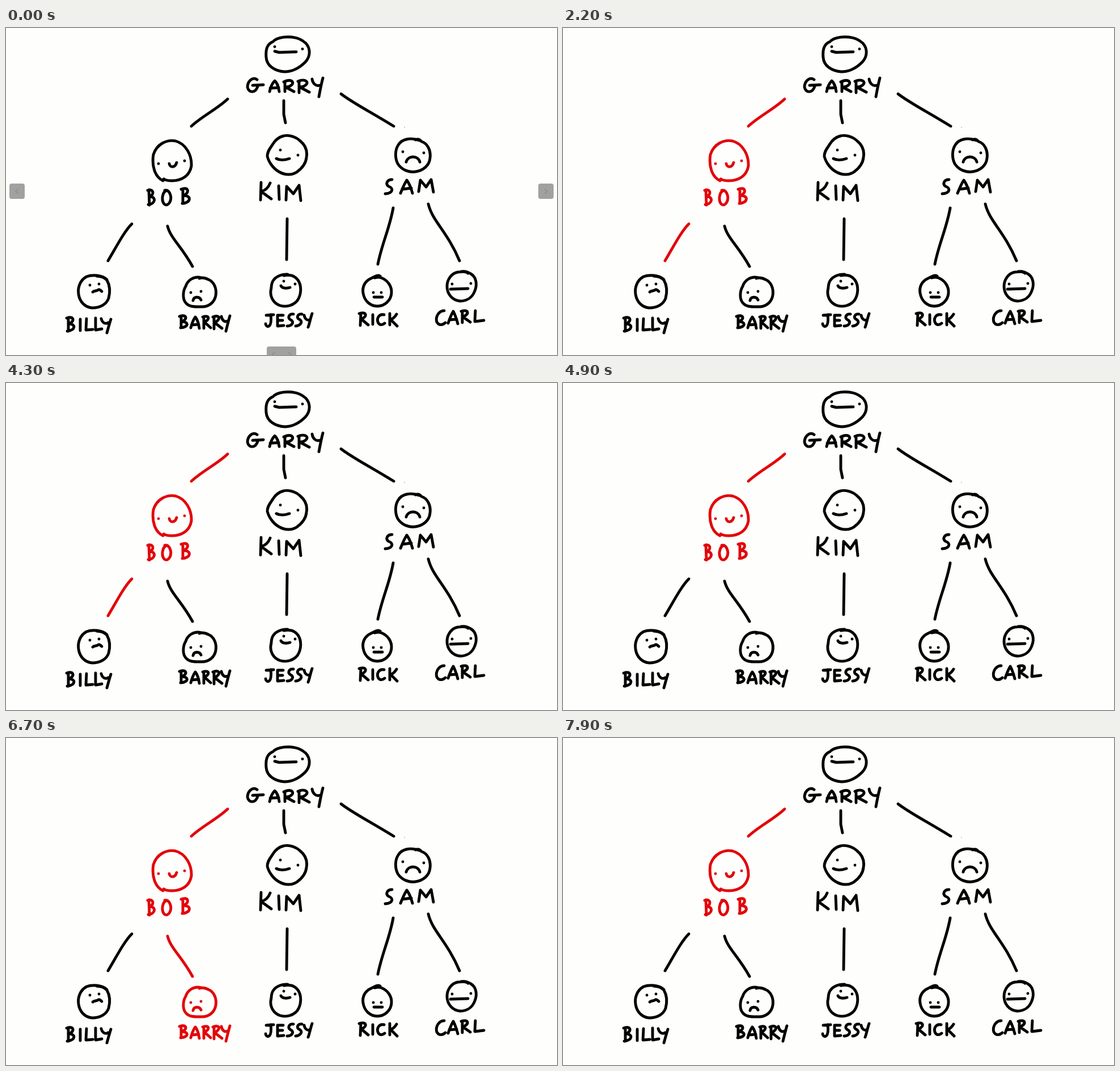
An HTML page for the animation above (8000 ms loop, 972 px wide and 576 px high).

```html
<!DOCTYPE html>
<html lang="en">
<head>
<meta charset="utf-8">
<title>Tree walk</title>
<style>
  html, body { margin: 0; width: 100%; height: 100%; overflow: hidden; background: #fefefc; }
  svg { display: block; }
  #tree { fill: none; stroke: #000; stroke-width: 4.9; stroke-linecap: round; stroke-linejoin: round; }
  #tree .on { stroke: #e2050a; }
  #buttons { fill: #a1a19f; }
  #buttons path { fill: none; stroke: #8b8b89; stroke-width: 1.5; }
</style>
</head>
<body>
<svg width="972" height="576" viewBox="0 0 972 576">
  <g id="tree">
    <!-- links -->
    <path id="toBob" d="M391 125C375 141 345 156 327 173"/>
    <path d="M490 128L490 152 493 167"/>
    <path d="M591 116C610 131 640 146 684 173"/>
    <path id="toBilly" d="M222 345C208 359 195 385 180 410"/>
    <path id="toBarry" d="M285 349C290 370 310 385 329 420"/>
    <path d="M496 336L495 408"/>
    <path d="M683 317C677 352 663 380 656 416"/>
    <path d="M745 310C752 340 778 358 800 410"/>

    <!-- each person: head, face, name -->
    <g>
      <path d="M473 22C484 14 510 13 524 23C537 31 539 48 528 60C518 70 505 77 491 77C475 76 460 67 459 52C458 40 459 29 471 24"/>
      <path d="M474 33h0M523 37h0M474 41L482 43 512 42"/>
      <path d="M443 91C434 85 426 95 426 104C428 115 440 115 444 103M435 101L454 100M465 112C467 103 470 97 474 93C478 96 481 105 482 112M466 106L481 105M492 94L492 112M490 95C501 89 508 94 505 99C502 103 497 104 493 104L508 112M517 94L517 114M515 94C526 89 534 94 530 99C527 103 522 104 518 104L535 113M540 90C541 98 547 103 553 101M559 88C556 99 554 110 552 121"/>
    </g>
    <g id="bob">
      <path d="M279 266L277 269C262 262 257 242 260 223C266 204 284 196 299 199C318 204 328 225 327 243C324 261 309 269 293 269C287 269 281 268 278 266"/>
      <path d="M269 239h0M315 234h0M288 239C289 246 298 247 301 237"/>
      <path d="M252 285L253 312M250 286C260 282 262 293 254 297C265 297 264 310 251 311M283 286C275 290 274 304 279 310C286 316 293 304 290 294C288 288 285 285 280 286M312 284L312 309M309 284C321 279 325 289 314 295C327 295 327 308 311 309"/>
    </g>
    <g>
      <path d="M486 191C497 187 510 191 518 198C528 206 532 217 530 228C529 239 522 247 514 253C505 260 492 259 483 254C473 249 464 238 461 226C461 216 467 211 471 204C476 196 482 192 490 190"/>
      <path d="M484 215h0M515 224h0M477 230C484 234 494 232 500 230"/>
      <path d="M450 272L449 303M466 273C463 281 458 286 450 288L468 301M481 278L482 302M494 303L495 279 507 292 517 277 520 304"/>
    </g>
    <g>
      <path d="M729 198C713 192 698 196 692 206C686 215 686 229 691 239C698 250 711 255 723 253C736 251 747 242 748 229C750 215 743 203 733 200C730 196 726 195 722 197"/>
      <path d="M700 218h0M737 220h0M706 236C709 224 727 224 730 236"/>
      <path d="M681 267C672 267 669 275 675 279C684 282 683 291 669 292M696 291C700 281 703 274 707 268C712 275 715 283 717 291M699 284L715 282M728 288L731 268 741 280 750 267 754 289"/>
    </g>
    <g id="billy">
      <path d="M178 443C169 435 152 434 142 438C131 444 126 457 128 469C130 482 139 492 152 493C166 493 177 487 181 476C184 465 183 453 178 444C173 439 166 437 160 437"/>
      <path d="M148 453h0M164 451h0M153 465C156 462 160 464 163 461C165 460 167 462 169 464"/>
      <path d="M110 511L110 534M107 511C119 507 122 515 112 521C123 522 123 532 108 534M131 513L131 533M142 512L141 532 153 531M158 511L158 532 169 530M168 512C170 520 176 522 180 519M185 513C182 522 180 530 178 537"/>
    </g>
    <g id="barry">
      <path d="M345 440C331 436 320 445 317 455C312 463 311 477 317 484C323 492 334 491 346 491C358 491 368 483 370 471C372 459 367 447 357 443C351 440 346 439 341 441"/>
      <path d="M326 466h0M344 464h0M330 480C331 473 341 472 344 479"/>
      <path d="M309 508L309 528M306 508C318 504 321 512 311 517C323 518 322 527 308 528M326 528C328 520 331 513 334 509C338 514 340 522 341 529M328 523L340 522M349 509L349 529M347 509C358 505 361 513 350 518L361 528M367 509L367 530M365 509C377 504 380 513 368 519L381 529M380 508C381 515 386 519 391 516M395 507C392 517 390 526 388 534"/>
    </g>
    <g>
      <path d="M497 434C488 433 477 437 472 444C467 450 469 456 467 463C466 475 473 486 484 489C494 492 507 489 514 480C521 470 522 454 515 444C510 437 501 434 490 436"/>
      <path d="M490 446h0M510 451h0M485 454C487 459 496 459 501 457"/>
      <path d="M459 506L472 505M467 505C468 514 468 522 464 525C461 527 458 524 458 521M489 506L479 506 479 525 490 524M479 515L488 515M507 504C499 503 496 511 502 514C509 517 505 525 496 525M522 504C514 503 512 511 517 513C524 516 521 524 511 525M526 506C527 512 531 516 536 514M540 503C537 511 536 519 533 527"/>
    </g>
    <g>
      <path d="M660 437C655 434 650 438 644 441C633 446 628 456 630 467C632 480 642 490 655 490C668 490 679 480 680 467C681 455 673 444 662 440C658 438 654 439 650 440"/>
      <path d="M648 466h0M662 466h0M649 474L664 474"/>
      <path d="M626 503L625 524M623 503C635 499 639 507 627 513L639 523M647 505L647 522M667 505C657 503 653 513 657 520C660 524 665 523 668 520M677 503L677 523M689 504C686 509 683 513 678 513L690 525"/>
    </g>
    <g>
      <path d="M815 432C810 427 803 430 797 430C786 432 778 443 778 455C778 469 788 480 801 481C814 481 823 474 827 463C832 451 829 438 820 433C814 429 808 428 803 429"/>
      <path d="M787 451h0M820 450h0M784 460L815 459"/>
      <path d="M773 498C764 498 757 508 760 518C764 525 771 523 775 519M780 520C783 511 786 504 789 499C793 506 795 514 797 521M782 514L795 513M805 499L805 519M803 499C815 495 819 503 806 509L819 518M828 498L827 517 843 515"/>
    </g>
  </g>
  <circle cx="703" cy="175" r="1" fill="#bbb"/>
  <g id="buttons">
    <rect x="6" y="274" width="27" height="27" rx="4"/>
    <rect x="939" y="274" width="27" height="27" rx="4"/>
    <rect x="460" y="561" width="52" height="27" rx="4"/>
    <path d="M22 284l-5 4 5 4M950 284l5 4-5 4M474 571l-4 4 4 4M498 571l4 4-4 4"/>
  </g>
</svg>
<script>
const LOOP = 8000;
// [start, end] in ms during which each part is red
const redTimes = {
  toBob: [900, LOOP],
  bob: [1700, LOOP],
  toBilly: [2200, 4900],
  billy: [2900, 4300],
  toBarry: [5900, 7900],
  barry: [6400, 7400],
};
const byId = id => document.getElementById(id);

function draw(now) {
  const t = now % LOOP;
  for (const [id, [start, end]] of Object.entries(redTimes))
    byId(id).classList.toggle('on', t >= start && t < end);
  byId('buttons').style.opacity = t < 100 ? 1 : t < 200 ? 0.5 : 0;
  requestAnimationFrame(() => draw(performance.now() - began));
}

const began = performance.now();
draw(0);
</script>
</body>
</html>
```
